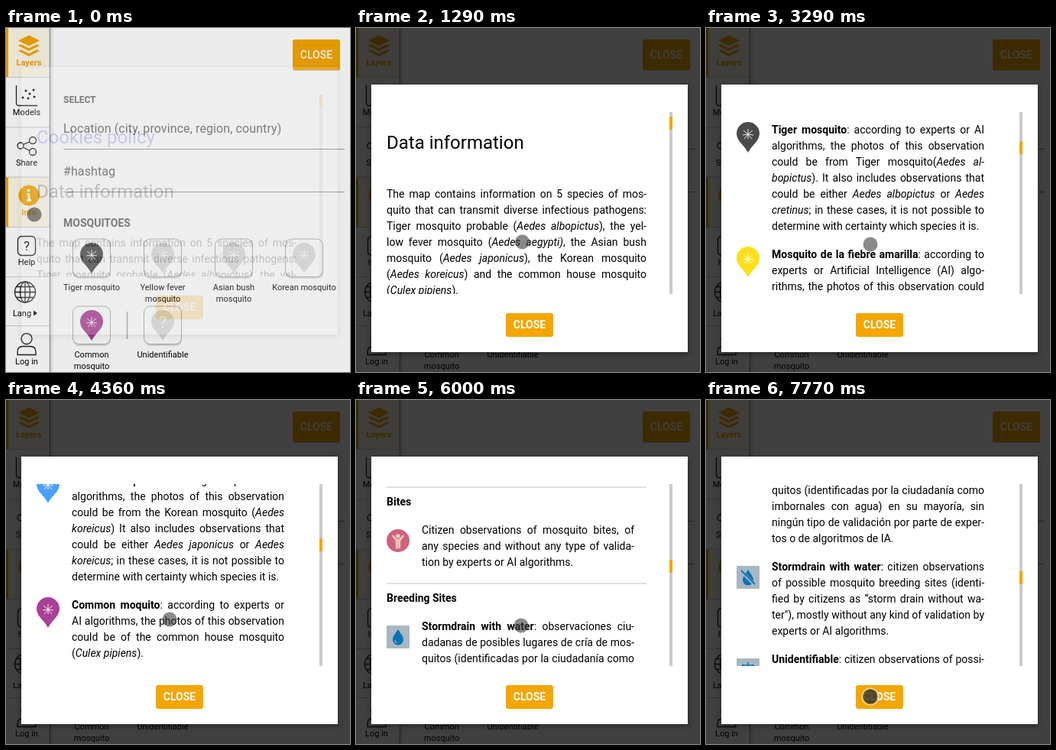
Write an HTML page that moves like this. It is 450x450 px and loops after 8 s.

```html
<!DOCTYPE html>
<html lang="en">
<head>
<meta charset="utf-8">
<title>Data information dialog</title>
<style>
  html, body { margin: 0; width: 100%; height: 100%; overflow: hidden; }
  #stage { position: relative; width: 450px; height: 450px; overflow: hidden; background: #fff; font-family: Roboto, sans-serif; }
  #app, #shade, #cursor { position: absolute; left: 0; top: 0; width: 450px; height: 450px; }
  #shade { background: #000; }
  #modal { position: absolute; left: 20px; top: 74px; width: 414px; height: 350px; background: #fff; box-shadow: 0 2px 8px rgba(0,0,0,.4); }
  #view { position: absolute; left: 20px; top: 36px; width: 374px; height: 238px; overflow: hidden; }
  #doc { position: absolute; left: -40px; top: -110px; font-size: 14px; color: #000; }
  #doc > * { position: absolute; }
  .line { height: 21px; line-height: 21px; white-space: nowrap; text-align: justify; text-align-last: justify; }
  .last { text-align-last: left; }
  .title { left: 40px; font-size: 24px; line-height: 30px; white-space: nowrap; }
  .rule { left: 40px; width: 340px; height: 2px; background: #e0e0e0; }
  b { font-weight: 700; }
  #track, #thumb { position: absolute; right: 0; width: 4px; }
  #track { top: 0; height: 238px; background: #c8cacc; }
  #thumb { height: 17px; background: #f3a600; }
  #ok { position: absolute; left: 176px; top: 299px; width: 62px; height: 31px; border-radius: 3px; background: #f3a600; color: #fff; font: 700 14px/31px Roboto, sans-serif; text-align: center; }
</style>
</head>
<body>
<div id="stage">
  <svg id="app" viewBox="0 0 450 450"></svg>
  <div id="shade"></div>
  <div id="modal">
    <div id="view">
      <div id="doc"></div>
      <div id="track"></div>
      <div id="thumb"></div>
    </div>
    <div id="ok">CLOSE</div>
  </div>
  <svg id="cursor" viewBox="0 0 450 450">
    <circle id="ring" r="11" fill="none" stroke="#ddd" stroke-opacity=".75" stroke-width="1.5"/>
    <circle id="dot" r="9.5"/>
  </svg>
</div>
<script>
const $ = id => document.getElementById(id);
const ORANGE = '#f3a600';

/* ---------- shared icons ---------- */
const bug = '<path d="M15 9v13M9 11l6 5 6-5M8 17l7-1 7 1M10 22l5-6 5 6" fill="none" stroke="#fff" stroke-width=".9"/>';
const pin = (color, mark = bug) =>
  `<path d="M15 40C10 30 0 25 0 15A15 15 0 0 1 30 15C30 25 20 30 15 40Z" fill="${color}"/>${mark}`;
const drop = '<path d="M15 5C18 10 22 14 22 18.500A7 7 0 0 1 8 18.500C8 14 12 10 15 5Z" fill="#0b72b5"/>';
const tile = mark => `<rect width="30" height="30" rx="1" fill="#a8b8c2"/>${mark}`;
const icons = {
  tiger: pin('#4a4a4a'), yellow: pin('#ffdf18'), bush: pin('#5fb760'),
  korean: pin('#4a9fff'), common: pin('#a93f96'), unknown: pin('#8d8d8d'),
  bite: '<circle cx="15" cy="15" r="15" fill="#d0617a"/><g fill="none" stroke="#f6c9c0" stroke-linecap="round"><path d="M8.500 9l4 5h5l4-5" stroke-width="2.600"/><path d="M13.300 15v9M16.700 15v9" stroke-width="3"/></g><circle cx="15" cy="9" r="2.800" fill="#f6c9c0"/>',
  water: tile(drop + '<path d="M11 19a4 4 0 0 0 3 4" stroke="#a8d0e8" fill="none"/>'),
  dry: tile(drop + '<path d="M6 7L24 25" stroke="#a8b8c2" stroke-width="4"/><path d="M6 6L24 24" stroke="#0b72b5" stroke-width="1.800"/>'),
  mixed: tile('<g fill="none" stroke="#0b72b5" stroke-width="1.600"><path d="M15 5v18M7 9h16M4 17l4-8 4 8zM18 17l4-8 4 8zM10 24h10"/></g>')
};

/* ---------- page behind the dialog ---------- */
const text = (x, y, size, str, opts = '') =>
  `<text x="${x}" y="${y + size * .35}" font-size="${size}" ${opts}>${str}</text>`;
const mid = 'text-anchor="middle"';

function card(x, y, color, label, mark) {
  const names = label.split('|').map((s, i) => text(x, y + 38.500 + i * 15, 11, s, mid)).join('');
  return `<rect x="${x - 24}" y="${y - 23}" width="49" height="50" rx="8" fill="#000" opacity=".13"/>
    <rect x="${x - 24.500}" y="${y - 25}" width="49" height="49.500" rx="8" fill="#fff" stroke="#aaa"/>
    <g transform="translate(${x - 15} ${y - 20})">${pin(color, mark)}</g>${names}`;
}

function buildApp() {
  const side = [
    ['Layers', 30, 45], ['Models', 27, 110], ['Share', 27, 176], ['Info', 30, 241],
    ['Help', 27, 306], ['Lang', 21, 373], ['Log in', 27, 436]
  ].map(([s, x, y]) => {
    const on = s === 'Layers' || s === 'Info';
    return text(x, y, 11, s, mid + (on ? ` fill="${ORANGE}" font-weight="700"` : ''));
  }).join('');
  const seps = [64.5, 130, 195, 260.5, 325.5, 389.5]
    .map(y => `<path d="M0 ${y}H57" stroke="#ccc"/>`).join('');
  const active = [[0, 64], [195, 65]].map(([y, h]) =>
    `<rect y="${y}" width="57" height="${h}" fill="#fdf6e6"/><rect y="${y}" width="3" height="${h}" fill="${ORANGE}"/>`).join('');
  const dots = [[22, 91], [26, 82], [29, 92], [31, 86], [36, 81], [37, 90]]
    .map(([x, y]) => `<circle cx="${x}" cy="${y}" r="1.500"/>`).join('');
  const quest = text(15, 16, 20, '?', mid + ' fill="#fff"');

  $('app').innerHTML = `<g font-family="Roboto, sans-serif">
    <rect x="375" y="16" width="62" height="40" rx="3" fill="#000" opacity=".2"/>
    <rect x="375" y="15" width="62" height="40" rx="3" fill="${ORANGE}"/>
    ${text(406, 35, 14, 'CLOSE', mid + ' fill="#fff" font-weight="500"')}
    <g fill="#666">
      ${text(75, 94, 12, 'SELECT', 'font-weight="700"')}
      ${text(75, 131, 16, 'Location (city, province, region, country)', 'letter-spacing=".1"')}
      ${text(75, 187, 16, '#hashtag', 'letter-spacing=".1"')}
      ${text(75, 255, 14, 'MOSQUITOES', 'font-weight="700" letter-spacing="0.200" style="font-size:17.500px"'.replace('17.500', '14').replace('0.200', '2.600') && 'font-weight="700"')}
    </g>
    <path d="M75 158.500H443M75 214.500H443" stroke="#999"/>
    ${card(112, 301, '#4a4a4a', 'Tiger mosquito')}
    ${card(205, 301, '#dcdcdc', 'Yellow fever|mosquito')}
    ${card(298, 301, '#dcdcdc', 'Asian bush|mosquito')}
    ${card(390, 301, '#dcdcdc', 'Korean mosquito')}
    ${card(112, 389, '#a93f96', 'Common|mosquito')}
    ${card(205, 389, '#dcdcdc', 'Unidentifiable', quest)}
    <path d="M158.500 371V407" stroke="#aaa" stroke-width="1.500"/>
    <rect x="57" width="5" height="450" fill="#000" opacity=".06"/>
    <rect width="57" height="450" fill="#fff"/>
    ${active}${seps}
    <path d="M57.500 0V450" stroke="#999" stroke-width="1.500"/>
    <g fill="${ORANGE}">
      <path d="M30 9.500L44 16.500 30 23.500 16 16.500Z"/>
      <path id="slab" d="M16 23L19.500 21.300 30 26.500 40.500 21.300 44 23 30 30Z"/>
      <use href="#slab" y="7"/>
      <circle cx="30" cy="219" r="13.500"/>
    </g>
    <path d="M30 217v8M27.500 217.500h2.500M27 225.500h6" stroke="#fff" stroke-width="2.800"/>
    <circle cx="29.500" cy="212.500" r="2" fill="#fff"/>
    <g fill="none" stroke="#222" stroke-width="1.300">
      <path d="M13.500 75V98Q13.500 101.500 17 101.500H41"/>
      <circle cx="19" cy="154" r="4"/><circle cx="35" cy="147" r="4.500"/><circle cx="35" cy="162" r="4.500"/>
      <path d="M22.700 152.300L31 148.800M22.500 156L31 160.300"/>
      <rect x="15.500" y="272.500" width="23" height="25" rx="5"/>
      <circle cx="25" cy="345.500" r="13.500"/><ellipse cx="25" cy="345.500" rx="6.500" ry="13.500"/>
      <path d="M25 332V359M11.500 345.500H38.500M14 338.500H36M14 352.500H36"/>
      <circle cx="27" cy="406.500" r="7"/>
      <path d="M15 427.500V424Q15 416.500 22 416.500H32Q39 416.500 39 424V427.500Z"/>
    </g>
    ${dots}
    ${text(27, 285, 17, '?', mid)}
    <path d="M36 369.500L41 373 36 376.500Z"/>
    ${side}</g>`;
}

/* ---------- dialog text ---------- */
function buildDoc() {
  const out = [];
  let y = 304;
  const line = (x, w, top, html, last) => out.push(
    `<div class="line${last ? ' last' : ''}" style="left:${x}px;width:${w}px;top:${top}px">${html}</div>`);
  const para = (str, x = 40, w = 340) => {
    const rows = str.split('|');
    rows.forEach((s, i) => line(x, w, y - 10 + i * 21, s, i === rows.length - 1));
    y += rows.length * 21 + 16;
  };
  const entry = (icon, str) => {
    const up = icons[icon].includes('A15 15') ? 10 : 1;
    out.push(`<svg style="left:40px;top:${y - up}px" width="30" height="40">${icons[icon]}</svg>`);
    para(str, 86, 278);
  };
  const section = name => {
    out.push(`<div class="rule" style="top:${y - 10}px"></div>`);
    y += 10;
    para(`<b>${name}</b>`);
  };

  out.push('<div class="title" style="top:151px;color:#22d">Cookies policy</div>');
  out.push('<div class="title" style="top:222px">Data information</div>');
  para('The map contains information on 5 species of mos-|quito that can transmit diverse infectious pathogens:|Tiger mosquito probable (<i>Aedes albopictus</i>), the yel-|low fever mosquito (<i>Aedes aegypti)</i>, the Asian bush|mosquito (<i>Aedes japonicus</i>), the Korean mosquito|(<i>Aedes koreicus</i>) and the common house mosquito|(<i>Culex pipiens</i>).');
  para('In addition, you can visualize possible breeding sites|for these insects on public roads. This information is|complemented with probability models, elaborated|from sampling data and the effort of people who|take part in the project.');
  para('The observations are classified by the species and|by the type of record. The meaning of each of the|symbols on the map is as follows.');
  section('Mosquitoes');
  entry('tiger', '<b>Tiger mosquito</b>: according to experts or AI|algorithms, the photos of this observation|could be from Tiger mosquito(<i>Aedes al-</i>|<i>bopictus</i>). It also includes observations that|could be either <i>Aedes albopictus</i> or <i>Aedes</i>|<i>cretinus</i>; in these cases, it is not possible to|determine with certainty which species it is.');
  entry('yellow', '<b>Mosquito de la fiebre amarilla</b>: according to|experts or Artificial Intelligence (AI) algo-|rithms, the photos of this observation could|be from the yellow fever mosquito (<i>Aedes</i>|<i>aegypti</i>). It also includes observations that|could be of a similar species.');
  entry('bush', '<b>Asian bush mosquito</b>: according to experts|or AI algorithms, the photos of this obser-|vation could be from the bush mosquito|(<i>Aedes japonicus</i>). It also includes records|that could be either <i>Aedes japonicus</i> or <i>Aedes</i>|<i>koreicus</i>; in these cases, it is not possible to|determine with certainty which species it is.');
  entry('korean', '<b>Korean mosquito</b>: according to experts or AI|algorithms, the photos of this observation|could be from the Korean mosquito (<i>Aedes</i>|<i>koreicus</i>) It also includes observations that|could be either <i>Aedes japonicus</i> or <i>Aedes</i>|<i>koreicus</i>; in these cases, it is not possible to|determine with certainty which species it is.');
  entry('common', '<b>Common moquito</b>: according to experts or|AI algorithms, the photos of this observation|could be of the common house mosquito|(<i>Culex pipiens</i>).');
  entry('unknown', '<b>Unidentifiable</b>: according to experts or AI|algorithms, the photos of this observation|do not allow the species to be identified. It|also includes observations with photos that|are not sharp enough, or where the parts of|the mosquito that are needed to tell one|species from another are missing or cannot|be seen clearly.');
  section('Bites');
  entry('bite', 'Citizen observations of mosquito bites, of|any species and without any type of valida-|tion by experts or AI algorithms.');
  section('Breeding Sites');
  entry('water', '<b>Stormdrain with water</b>: observaciones ciu-|dadanas de posibles lugares de cría de mos-|quitos (identificadas por la ciudadanía como|imbornales con agua) en su mayoría, sin|ningún tipo de validación por parte de exper-|tos o de algoritmos de IA.');
  entry('dry', '<b>Stormdrain with water</b>: citizen observations|of possible mosquito breeding sites (identi-|fied by citizens as “storm drain without wa-|ter"), mostly without any kind of validation by|experts or AI algorithms.');
  entry('mixed', '<b>Unidentifiable</b>: citizen observations of possi-|ble breeding sites.');
  $('doc').innerHTML = out.join('');
}

/* ---------- motion: [tick, values...] at 8.5 ticks per second ---------- */
const LOOP = 8000, TICK = LOOP / 68;
const scroll = [[4, 0], [11, 87], [13, 87], [19, 208.5], [20, 208.5], [27, 556], [32, 796],
  [33, 796], [40, 1259], [43, 1259], [50, 1493], [57, 1726]];
const pointer = [[4, 37, 244], [8, 218, 280], [17, 216, 279], [28, 215, 283], [37, 214, 287],
  [40, 214, 287], [42, 217, 292], [51, 216, 295], [54, 216, 297], [57, 213, 351], [58, 212, 353],
  [60, 212, 353], [62, 214, 379], [64, 214, 379], [65, 215, 388]];
const fade = [[0, .08, .18, -23], [1, .5, .75, -6], [2, .75, 1, 0]]; // shade, dialog, offset

const linear = u => u, smooth = u => u * u * (3 - 2 * u);

function at(keys, k, ease) {
  if (k <= keys[0][0]) return keys[0].slice(1);
  const i = keys.findIndex(p => p[0] >= k);
  if (i < 0) return keys[keys.length - 1].slice(1);
  const a = keys[i - 1], b = keys[i], u = ease((k - a[0]) / (b[0] - a[0]));
  return a.slice(1).map((v, n) => v + (b[n + 1] - v) * u);
}

function draw(ms) {
  const k = Math.floor((ms % LOOP + 6) / TICK) % 68;
  const [shade, alpha, dy] = at(fade, k, linear);
  $('shade').style.opacity = shade;
  $('modal').style.opacity = alpha;
  $('modal').style.transform = `translateY(${dy}px)`;

  const s = Math.round(at(scroll, k, smooth)[0]);
  $('doc').style.transform = `translateY(${-s}px)`;
  $('thumb').style.top = s * .066 + 'px';

  const [x, y] = at(pointer, k, smooth), pressed = k >= 66;
  $('cursor').style.transform = `translate(${x}px, ${y}px)`;
  $('cursor').style.overflow = 'visible';
  $('dot').setAttribute('fill', pressed ? 'rgba(40,40,40,.78)' : 'rgba(60,60,60,.6)');
  $('ring').style.display = pressed ? '' : 'none';
}

buildApp();
buildDoc();
const start = performance.now();
(function loop() {
  draw(performance.now() - start);
  requestAnimationFrame(loop);
})();
</script>
</body>
</html>
```
